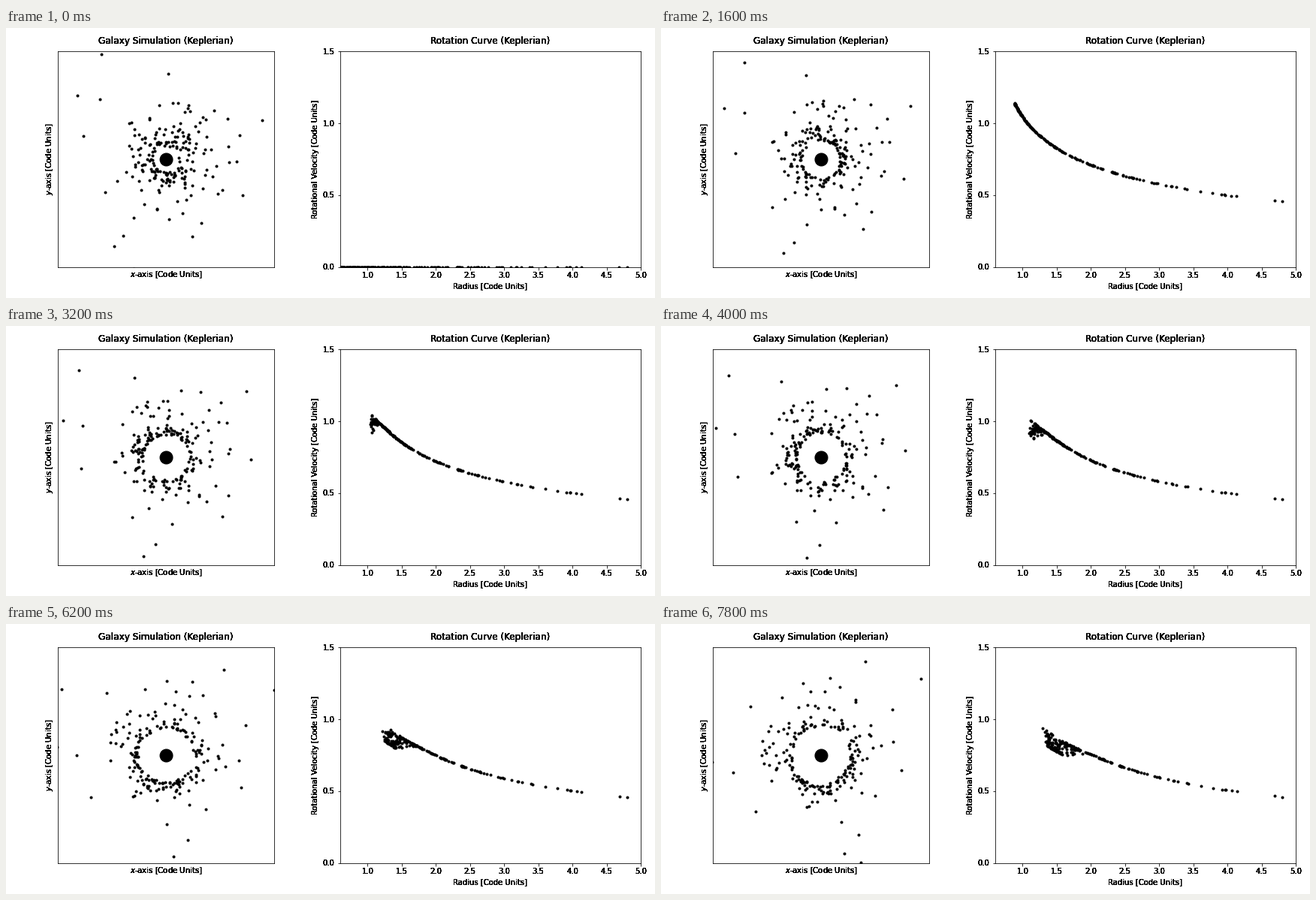
Animation, 864 px wide and 360 px high, one loop 8 s. Source, as a matplotlib script:

```python
import numpy as np
import matplotlib.pyplot as plt
from matplotlib.animation import FuncAnimation

W, H = 864, 360
FRAMES, INTERVAL = 40, 200
DT = 0.2            # simulation time per frame
SCALE = 28.8        # pixels per code unit
CENTRE = np.array([213, 175])
TOP, BOTTOM = 31, 319
R_MIN, R_MAX, V_MAX = 0.6, 5, 1.5

plt.rcParams["font.family"] = "DejaVu Sans"
plt.rcParams["mathtext.fontset"] = "dejavusans"

# A few far stars in stage pixels, two of them off the plot at first
FAR = np.array([(127, 35), (95, 90), (341, 123), (144, 291), (125, 95),
                (156, 277), (103, 144), (216, 61), (315, 223), (380, 158),
                (170, 321)])


def initial_stars(rng, count=190):
    """Exponential disc plus the far stars, as radius and angle."""
    x, y = ((FAR - CENTRE) / SCALE).T
    disc = R_MIN - 0.9 * np.log(1 - 0.975 * rng.random(count))
    turn = rng.uniform(0, 2 * np.pi, count)
    return np.append(np.hypot(x, y), disc), np.append(np.arctan2(-y, x), turn)


def simulate():
    """Keplerian orbits with the outward drift of a coarse integrator."""
    rng = np.random.default_rng(7)
    r0, angle = initial_stars(rng)
    spread = rng.normal(0, 0.3, r0.size)
    wobble = rng.normal(0, 0.025, r0.size)
    r, phase = r0, np.zeros(r0.size)
    states = [(r0, angle, phase)]
    for n in range(1, FRAMES):
        phase = phase + DT * r ** -1.5
        ramp = (1 - np.cos(np.minimum(phase, np.pi))) / 2
        r = np.cbrt(r0 ** 3 + 0.06 * n * ramp)
        late = np.clip((phase - np.pi) / 3, 0, 1)
        radius = r * (1 + late * wobble)
        p = phase + spread * np.maximum(phase - 2, 0)
        excess = np.where(p < np.pi, 0.035 * (1 - np.cos(p)),
                          0.01 - 0.06 * np.cos(p))
        states.append((radius, angle + phase, radius ** -0.5 * (1 + excess)))
    return states


def add_axes(x0, x1, xlim, ylim):
    ax = fig.add_axes([x0 / W, 1 - BOTTOM / H, (x1 - x0) / W,
                       (BOTTOM - TOP) / H])
    ax.set(xlim=xlim, ylim=ylim, xticks=[], yticks=[])
    return ax


def label(x, y, s, size=10, ha="center", rotation=0):
    # Repeated drawing gives the text its heavy edges
    for _ in range(8):
        fig.text(x / W, 1 - y / H, s, fontsize=size, ha=ha, va="baseline",
                 rotation=rotation, rotation_mode="anchor")


fig = plt.figure(figsize=(W / 72, H / 72), dpi=72, facecolor="white")

sky = add_axes(69, 357, (-5, 5), (-5, 5))
label(213, 21, "Galaxy Simulation (Keplerian)", 12)
label(213, 332, "$x$-axis [Code Units]")
label(61, 175, "$y$-axis [Code Units]", rotation=90)

curve = add_axes(445, 845, (R_MIN, R_MAX), (0, V_MAX))
label(644.5, 21, "Rotation Curve (Keplerian)", 12)
label(644.5, 347, "Radius [Code Units]")
label(415, 175, "Rotational Velocity [Code Units]", rotation=90)

xticks = np.arange(1, 5.1, 0.5)
yticks = np.arange(0, 1.6, 0.5)
curve.set_xticks(xticks, [""] * len(xticks))
curve.set_yticks(yticks, [""] * len(yticks))
for v in xticks:
    label(445 + (v - R_MIN) * 400 / (R_MAX - R_MIN), 333, f"{v:.1f}")
for v in yticks:
    label(437.5, 322 - v * 287 / V_MAX, f"{v:.1f}", ha="right")

sky.plot(0, 0, "ko", markersize=17)
stars, = sky.plot([], [], "k.", markersize=6)
speeds, = curve.plot([], [], "k.", markersize=6)
states = simulate()


def update(n):
    r, angle, v = states[n]
    stars.set_data(r * np.cos(angle), r * np.sin(angle))
    speeds.set_data(r, v)
    return stars, speeds


anim = FuncAnimation(fig, update, frames=FRAMES, interval=INTERVAL,
                     repeat=True, blit=False)
plt.show()
```
